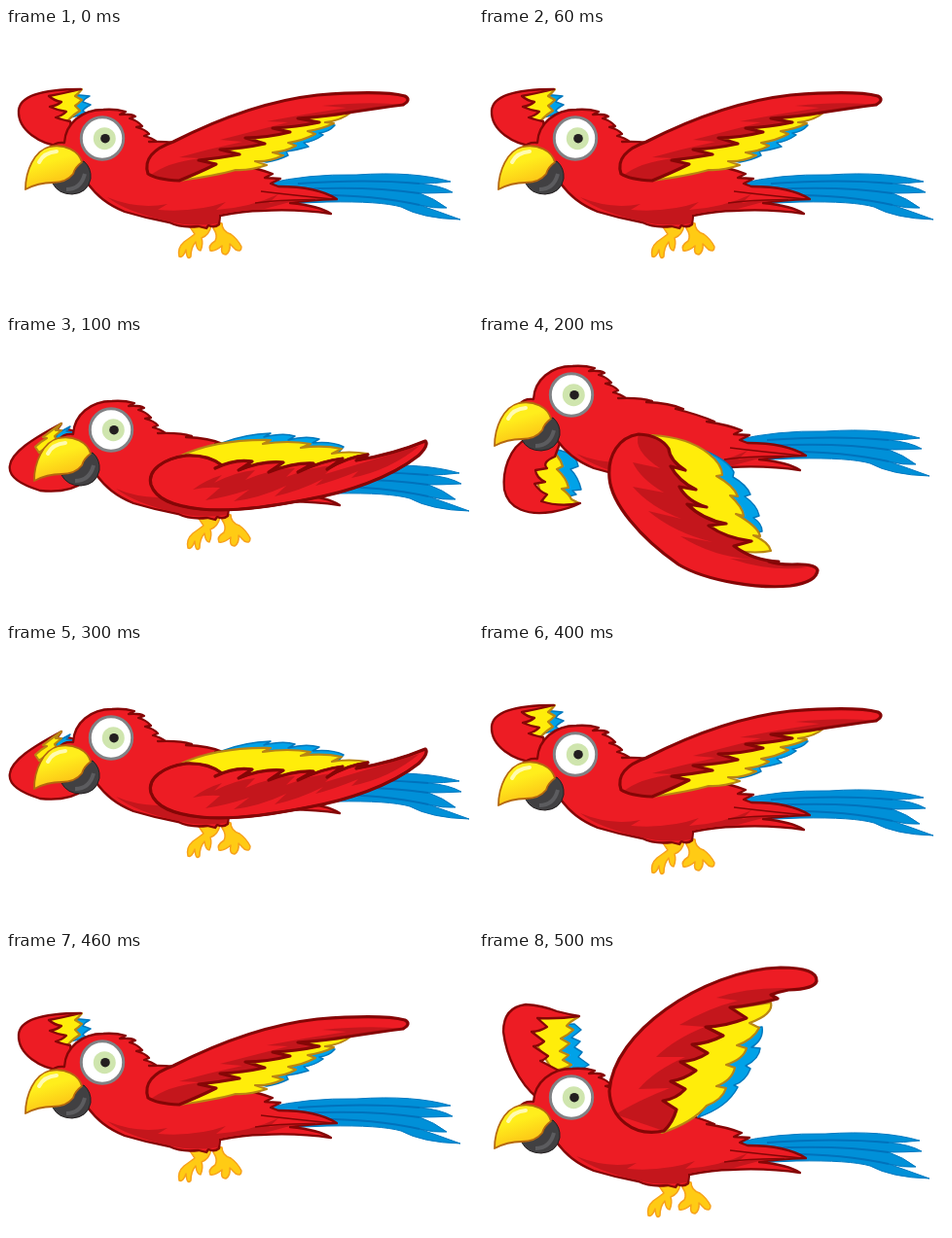
Write an HTML page that moves like this. It is 480x288 px and loops after 600 ms.

```html
<!DOCTYPE html>
<html lang="en">
<head>
<meta charset="utf-8">
<title>Flying parrot</title>
<style>
  html, body { margin: 0; width: 100%; height: 100%; overflow: hidden; background: #fff; }
  svg { display: block; width: 100vw; height: 100vh; }
  path { stroke-linejoin: round; }
  .red { fill: #ed1c24; stroke: #850606; stroke-width: 2.3; }
  .dark { fill: #c4161c; }
  .lit { fill: #ed1c24; }
  .edge { fill: none; stroke: #850606; stroke-width: 3.2; }
  .crease { fill: none; stroke: #850606; stroke-width: 1.6; }
  .yellow { fill: #ffed0a; stroke: #b98512; stroke-width: 2.2; }
  .blue { fill: #00a2e8; stroke: #0077bd; stroke-width: 1.5; }
  .tail { fill: #0090d8; stroke: #0078c1; stroke-width: 1; }
  .vane { fill: none; stroke: #0072bc; stroke-width: 2; }
  .foot { fill: #ffcb14; stroke: #f7a11a; stroke-width: 1.5; }
</style>
</head>
<body>
<svg viewBox="0 0 480 288">
  <defs>
    <linearGradient id="gold" x1="0" y1="0" x2=".4" y2="1">
      <stop offset=".45" stop-color="#ffee1c"/>
      <stop offset="1" stop-color="#fcc016"/>
    </linearGradient>
  </defs>
  <g id="far"></g>
  <g id="body">
    <path class="tail" d="M268 160Q310 150 360 151Q420 147 457 158Q440 160 425 160Q447 162 459 169Q440 170 425 170Q440 175 453 185Q440 186 425 182Q445 189 467 197Q428 196 406 184Q385 178 330 179L280 181Z"/>
    <path class="vane" d="M300 160Q370 155 425 160M300 166Q370 162 425 170M300 172Q370 170 425 182"/>
    <path class="foot" d="M188 203L211 203Q209 213 201 216Q203 222 200 229Q196 229 195 220Q190 226 190 235Q186 240 185 228Q182 237 178 235Q176 226 183 220Q190 215 194 212Z"/>
    <path class="foot" d="M213 199L222 201Q222 209 231 212Q238 217 242 225Q242 231 236 228L230 222Q231 230 226 233Q220 233 222 224Q215 230 210 229Q207 224 215 219Q218 213 213 206Z"/>
    <path class="red" d="M46 123Q50 117 60 118C61 98 78 84 100 84Q112 83 123 86L117 89Q128 88 133 91L127 93Q135 95 140 101L134 102Q143 104 147 109L142 111Q150 113 155 117L147 117Q170 116 182 120L176 121Q200 122 214 128L206 128Q230 134 246 141L238 141Q258 144 274 150L266 154L282 155L272 160L280 163Q320 163 340 176Q310 177 292 180Q322 183 334 191Q300 186 262 188Q246 188 220 193L219 202Q214 206 208 203L206 206L198 204Q180 206 168 200Q145 196 122 189C103 181 93 172 84 160Z"/>
    <path class="dark" d="M104 174Q135 187 166 181L156 187Q195 190 226 179L216 187Q250 185 280 171L270 180Q300 175 336 175Q310 177 292 179L262 187Q240 187 219 192L218 201Q190 205 168 199Q125 190 104 174Z"/>
    <path class="crease" d="M262 168Q295 172 336 176M256 180Q290 176 318 177"/>
    <path d="M48 160Q57 159 66 154Q72 147 74 139L80 137Q88 144 87 155Q84 170 68 171Q54 171 48 160Z" fill="#414042" stroke="#231f20"/>
    <path d="M62 166Q77 166 81 150" fill="none" stroke="#5c5c5f" stroke-width="4"/>
    <path d="M20 166C20 147 29 126 45 122C60 119 75 126 78 138Q71 143 69 150Q62 159 48 159Q33 159 20 166Z" fill="url(#gold)" stroke="#b5680f" stroke-width="1.8"/>
    <path d="M34 138Q39 128 52 127" fill="none" stroke="#fffbb0" stroke-width="4" stroke-linecap="round"/>
    <circle cx="99" cy="113.5" r="21.7" fill="#fff" stroke="#808285" stroke-width="3"/>
    <circle cx="101.3" cy="113.7" r="11.5" fill="#cfe5ae"/>
    <circle cx="102" cy="113.7" r="4.8" fill="#231f20"/>
  </g>
  <g id="near"></g>
</svg>
<script>
const $ = id => document.getElementById(id);

// Layers of a raised or lowered wing: shaded base, lit upper part, outline
const wing = (blue, yellow, front, feathers, light) => [
  ['blue', blue], ['yellow', yellow],
  ['dark', front + feathers], ['lit', front + light], ['edge', front + feathers]
];
const layers = (...paths) => ['blue', 'yellow', 'red'].map((c, i) => [c, paths[i]]);

const folded = 'M149 153C145 138 162 126 185 123Q208 122 222 133L215 136Q235 126 253 129L239 138Q264 128 285 130L270 140Q296 130 316 131L300 140Q326 128 346 126L330 137Q352 124 372 122L360 128Q400 121 431 108Q435 112 424 123C395 146 350 161 310 168C270 176 230 181 200 178C172 175 154 168 149 153Z';

const half = {
  shift: [0, 0],
  far: layers(
    'M66 68L86 70Q80 73 79 76L87 79Q81 82 79 85L83 88L66 92Z',
    'M45 68L78 63Q75 67 71 70L78 74Q74 78 71 80L76 85Q65 92 60 100L45 95Z',
    'M58 122C35 120 12 105 13 85C14 70 35 63 77 63Q60 67 44 70Q50 75 57 76Q52 80 45 81Q54 85 62 86Q58 90 51 92Q60 95 66 96L70 122Z'),
  near: wing(
    'M250 135L320 97L338 100Q332 107 322 108L326 110Q316 117 306 118L311 122Q298 126 288 127L290 131Q280 136 268 138Z',
    'M178 157L200 120L330 82L354 87Q345 95 328 97L337 98Q325 104 310 106L318 109Q305 116 290 118L298 121Q288 127 274 128L285 131Q270 138 256 137L268 141Q250 147 236 146Q215 152 178 157Z',
    'M146 150C141 135 152 124 172 117C225 90 275 74 320 69C360 66 395 66 410 70Q417 74 408 79',
    'Q385 82 352 87Q330 91 300 93L322 97Q298 102 274 103L292 107Q268 113 246 113L266 119Q243 124 220 125L240 130Q218 134 198 136L216 140Q200 148 178 157Q155 156 146 150Z',
    'Q375 75 325 80L350 82Q310 88 268 96L290 97Q255 106 220 115L243 117Q210 124 178 133L200 134Q165 138 148 152Z')
};
const level = {
  shift: [9, -17],
  far: [
    ['red', 'M80 150Q65 162 35 159C12 152 2 143 4 133C6 120 25 107 57 90L48 103L64 96L74 99Z'],
    ['blue', 'M53 100L66 93L62 98L69 99L62 108L50 108Z'],
    ['yellow', 'M57 90Q48 96 38 104L42 105Q35 109 30 114L34 120L52 107L50 103L57 97L51 97Z']
  ],
  near: [
    ['blue', 'M222 110Q245 101 272 100L265 104Q285 99 297 103L290 107Q308 102 322 106L315 110Q335 108 347 114L340 122L230 125Z'],
    ['yellow', 'M178 124Q215 106 272 107L264 111Q290 107 313 111L303 115Q325 112 345 116L335 121Q352 118 372 121L340 146L210 146Z'],
    ['red', folded],
    ['dark', 'M192 158Q205 148 222 143L214 151Q235 140 256 138L246 148Q275 136 297 136L288 145Q315 134 338 133L328 142Q375 128 425 113Q395 138 355 146L362 139Q335 150 318 154L326 147Q300 160 276 165L288 154Q260 167 234 170L250 158Q225 166 205 169L220 156Q205 155 192 158Z'],
    ['edge', folded]
  ]
};
const down = {
  shift: [-4, -53],
  far: layers(
    'M75 115L94 121Q100 125 102 134L94 137Q102 145 105 158L96 159L100 163L80 168Z',
    'M68 112Q84 124 86 134L80 137Q90 146 92 156L85 157Q93 163 95 168L103 172L68 177L54 130Z',
    'M50 105C30 115 24 140 26 158C30 178 50 185 75 181Q92 178 104 172Q82 176 64 170L70 163Q62 160 57 152L68 150Q59 146 58 138L70 136Q64 130 78 124L84 108Z'),
  near: wing(
    'M225 115Q256 127 262 140L261 145Q275 153 279 163L273 165Q286 174 288 185L282 187Q291 193 291 201L270 205L235 160Z',
    'M178 102Q215 104 236 121Q250 132 250 143L244 144Q262 154 266 165L258 164Q271 176 272 185L264 183Q287 196 289 206L282 205Q298 212 300 221Q285 224 265 221L190 170Z',
    'M164 101C144 104 132 122 134 146C136 172 165 207 205 235C235 253 290 260 320 257Q347 253 348 241Q346 234 322 235Q306 235 298 232',
    'L308 232Q282 231 262 216L280 211Q254 208 236 195L254 193Q230 189 214 173L234 176Q214 170 206 155L223 158Q205 149 197 134L212 138Q196 128 195 116Q186 102 164 101Z',
    'L338 238Q300 243 258 229L282 230Q240 227 207 206L240 212Q200 202 174 180L208 188Q176 176 158 155L190 161Q166 147 158 130L186 136Q158 118 164 101Z')
};
const up = {
  shift: [-4, 36],
  far: layers(
    'M80 75L98 74L105 80Q99 85 95 88L104 92L98 98L106 103L102 108L113 116Q105 122 86 121Z',
    'M60 64L102 67Q93 72 90 76L97 80Q91 86 84 89L93 94Q87 99 83 102L92 106L86 111L95 116Q88 121 76 122L56 90Z',
    'M60 150C41 135 28 107 25 82Q25 57 48 54Q65 55 80 61Q92 64 103 66Q82 69 60 68L70 77Q62 82 54 82L67 92Q61 97 56 97L71 107Q66 112 63 112L82 122L88 135Z'),
  near: wing(
    'M245 140L265 80L291 77Q293 90 280 98L289 99Q288 110 274 117L279 120Q274 133 262 137L266 139Q255 160 225 170Z',
    'M188 186L160 140L250 60L300 52Q303 64 278 73L288 78Q282 90 265 96L275 99Q272 110 254 116L263 119Q260 132 244 138L254 140Q250 152 234 158Q220 175 188 186Z',
    'M190 184C158 191 135 170 134 143C136 112 160 82 192 59C225 35 270 17 310 16Q348 16 347 30Q345 38 318 39Q308 41 300 44',
    'L307 48Q282 55 258 57L275 68Q252 77 233 77L251 86Q236 94 219 95L235 104Q223 112 207 113L223 122Q211 131 197 133L212 141Q203 151 189 153L203 162Q199 176 190 184Z',
    'L318 37Q276 36 244 47L266 50Q235 58 206 75L232 77Q200 90 182 108L212 108Q180 122 164 141L196 140Q165 152 140 167Z')
};

const cycle = [half, level, down, level, half, up];
const markup = list => list.map(([c, d]) => `<path class="${c}" d="${d}"/>`).join('');
let shown;

function draw(now) {
  const pose = cycle[Math.floor(now / 100) % cycle.length];
  if (pose !== shown) {
    shown = pose;
    $('far').innerHTML = markup(pose.far);
    $('near').innerHTML = markup(pose.near);
    $('body').setAttribute('transform', `translate(${pose.shift})`);
  }
}

const start = performance.now();
function tick() {
  draw(performance.now() - start);
  requestAnimationFrame(tick);
}
tick();
</script>
</body>
</html>
```
